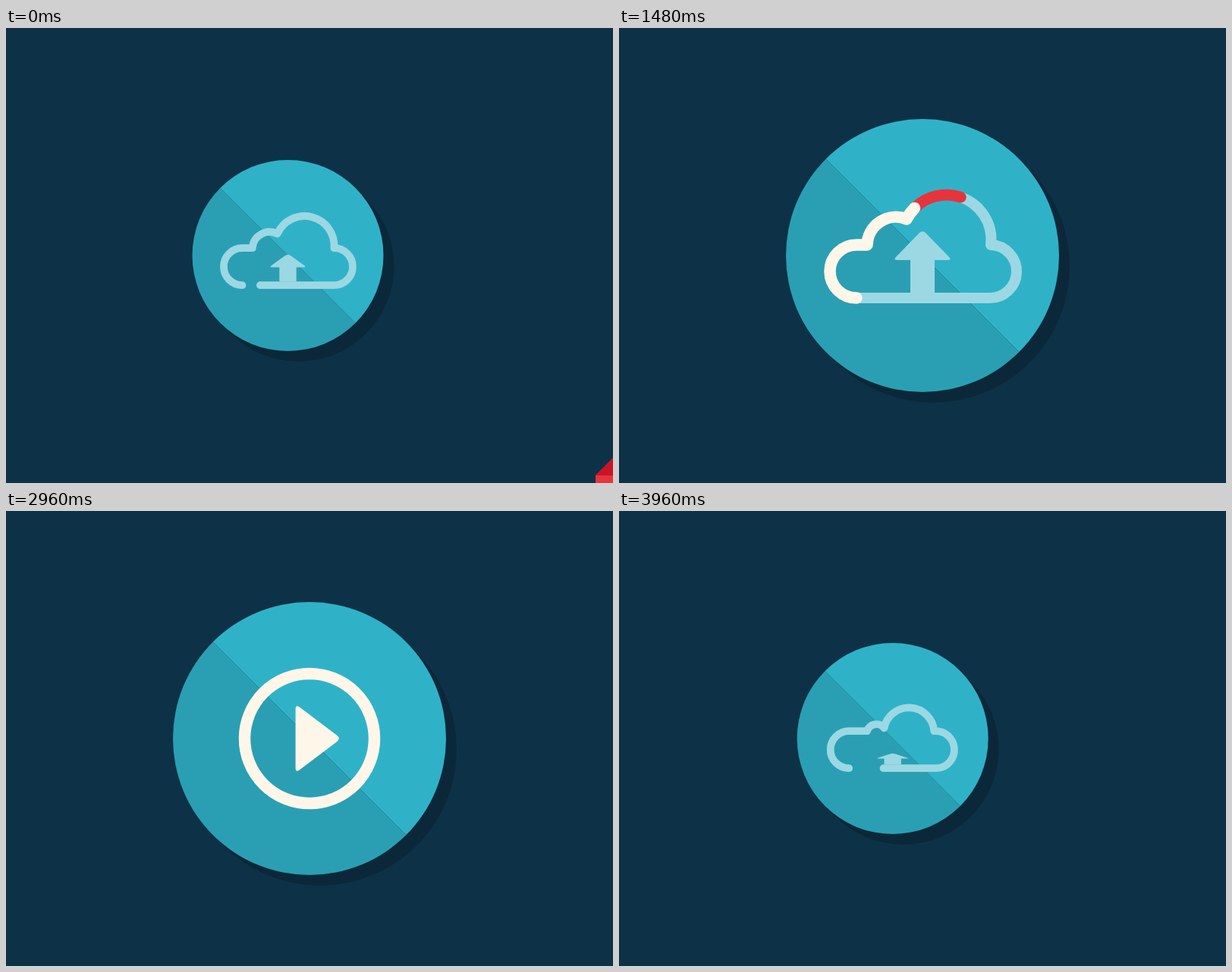
Animation of 800 by 600 pixels, one loop 4.04 s. Source, as an HTML page with a canvas:

```html
<!DOCTYPE html>
<html lang="en">
<head>
<meta charset="utf-8">
<title>Cloud upload</title>
<style>
  html, body { margin: 0; height: 100%; overflow: hidden; background: #0d3247; }
  canvas { display: block; width: 100vw; height: 100vh; }
</style>
</head>
<body>
<canvas id="stage" width="800" height="600"></canvas>
<script>
const g = document.getElementById('stage').getContext('2d');
const NAVY = '#0d3247', RED = '#e6343c', CREAM = '#fef7e9', PALE = '#9bd8e3';
const TEAL = '#2fb2c8', DEEP_TEAL = '#2a9fb3', SHADE = 'rgba(0,0,0,.2)';
const SHADOW = 14, LOOP = 4040, STEP = 40;

const mix = (a, b, p) => a + (b - a) * p;
const part = (t, from, to) => Math.min(1, Math.max(0, (t - from) / (to - from)));
const easeOut = (p, power) => 1 - (1 - p) ** power;
const easeInOut = p => (1 - Math.cos(Math.PI * p)) / 2;

// Blends two poses that share the same keys.
function blend(a, b, p) {
  return Object.fromEntries(Object.keys(a).map(key => [key, mix(a[key], b[key], p)]));
}

function at(x, y, scale, turn, draw) {
  g.save();
  g.translate(x, y);
  g.scale(scale, scale);
  g.rotate(turn * Math.PI / 180);
  draw();
  g.restore();
}

function fill(path, color) {
  g.fillStyle = color;
  g.fill(path);
}

// Strokes a path, or only the stretch between two distances along it.
function stroke(path, color, width, from = 0, to = 9999) {
  if (to <= from) return;
  g.strokeStyle = color;
  g.lineWidth = width;
  g.lineCap = g.lineJoin = 'round';
  g.setLineDash(to < 9999 ? [to - from, 9999] : []);
  g.lineDashOffset = -from;
  g.stroke(path);
}

// Polygon whose corners are cut back by `cut` and curved.
function softPolygon(points, cut) {
  const path = new Path2D();
  const toward = (a, b) => {
    const k = cut / Math.hypot(b[0] - a[0], b[1] - a[1]);
    return [mix(a[0], b[0], k), mix(a[1], b[1], k)];
  };
  points.forEach((p, i) => {
    const n = points.length;
    path.lineTo(...toward(p, points[(i + n - 1) % n]));
    path.quadraticCurveTo(...p, ...toward(p, points[(i + 1) % n]));
  });
  path.closePath();
  return path;
}

// Side lobes have radius `side`; two bumps join points a, b and c.
// A bump's radius is its chord times its bend.
const SEED = { left: -76, right: 79, side: 35, base: 56, ax: -17, ay: -14, bx: -10, by: 16,
  cx: 63, cy: -14, bendAB: .5, bendBC: .5 };
const CLOUD = { left: -87, right: 88, side: 35, base: 56, ax: -73, ay: -14, bx: -21, by: -48,
  cx: 90, cy: -14, bendAB: .61, bendBC: .508 };
const RING = { left: 0, right: 0, side: 85.5, base: 85.5, ax: 0, ay: -85.5, bx: 0, by: -85.5,
  cx: 0, cy: -85.5, bendAB: 2, bendBC: .62 };

const SPROUT = { tip: 58, wing: 54, half: 28.5, tail: 49 };
const ARROW = { tip: -34, wing: 6, half: 39, tail: 49 };
const PLAY = { tip: -42, wing: 18, half: 45, tail: 18 };

const sprouting = t => part(t, -160, 80);

function cloudPath(t) {
  const grown = sprouting(t);
  const c = t < 1000 ? blend(SEED, CLOUD, easeOut(grown, 2))
    : blend(CLOUD, RING, easeInOut(part(t, 2230, 2750)));
  const lineEnd = mix(15, c.left, grown);
  const lobe = (r, x, y) => `A${r} ${r} 0 0 1 ${x} ${y}`;
  const bump = (bend, x0, y0, x, y) => lobe(bend * Math.hypot(x - x0, y - y0), x, y);
  return new Path2D(`M${c.left} ${c.base}` + lobe(c.side, c.left, c.base - 2 * c.side) +
    `L${c.ax} ${c.ay}` + bump(c.bendAB, c.ax, c.ay, c.bx, c.by) +
    bump(c.bendBC, c.bx, c.by, c.cx, c.cy) + lobe(c.side, c.right, c.base) + `L${lineEnd} ${c.base}`);
}

function drawCloud(t) {
  if (t < -160) {
    stroke(new Path2D('M-10 44V-4A12 12 0 0 1 13 2M34 -17h.1'), PALE, 14);
    return;
  }
  const path = cloudPath(t), length = 652;
  const head = length * part(t, 1160, 1905), tail = length * part(t, 1235, 1980);
  if (tail === length) return stroke(path, CREAM, 15.5);
  stroke(path, PALE, 14);
  stroke(path, RED, 15, tail, head);
  stroke(path, CREAM, 15.5, 0, tail);
}

function drawArrow(t) {
  if (t < -130) return;
  const turned = easeInOut(part(t, 2230, 2670));
  const a = t < 1000 ? blend(SPROUT, ARROW, sprouting(t)) : blend(ARROW, PLAY, turned);
  const shape = color => {
    fill(softPolygon([[0, a.tip], [a.half, a.wing], [-a.half, a.wing]], 6), color);
    if (a.tail > a.wing) g.fillRect(-16, a.wing - 1, 32, a.tail - a.wing + 1);
  };
  at(0, 0, 1, 90 * turned, () => {
    g.translate(0, -20 * Math.sin(Math.PI * turned));
    shape(PALE);
    g.globalAlpha = part(t, 1900, 2080);
    shape(CREAM);
  });
}

function halfDisc(x, y, r, start, color) {
  const path = new Path2D();
  path.arc(x, y, r, start, start + Math.PI);
  fill(path, color);
}

function drawDisc(x, upper, lower, icon, t) {
  const up = -Math.PI * .75, down = Math.PI * .25;
  halfDisc(x + SHADOW, 300 + SHADOW, Math.min(upper, 180), up, SHADE);
  halfDisc(x + SHADOW, 300 + SHADOW, Math.min(lower, 180), down, SHADE);
  halfDisc(x, 300, upper, up, TEAL);
  halfDisc(x, 300, lower, down, DEEP_TEAL);
  at(x, 300, icon, 0, () => {
    drawCloud(t);
    if (t < 2680) drawArrow(t);
  });
}

// Springs from 126 past 180 and back.
function restingRadius(t) {
  const q = part(t, 386, 866) - 1;
  return 126 + 54 * (1 + 3.7 * q ** 3 + 2.7 * q * q);
}

function drawFile() {
  const paper = new Path2D('M46 0H138A12 12 0 0 1 150 12V168A12 12 0 0 1 138 180H12A12 12 0 0 1 0 168V46Z');
  const camera = new Path2D('M39 76H90Q92 76 92 78V92L109 80.5Q116 77 116 84V120Q116 127 109 123.5L92 112V125Q92 127 90 127H39Q37 127 37 125V78Q37 76 39 76Z');
  const shaded = (path, color) => {
    at(SHADOW, SHADOW, 1, 0, () => fill(path, SHADE));
    fill(path, color);
  };
  shaded(paper, RED);
  fill(new Path2D('M46 0V46H0Z'), '#cb1424');
  shaded(camera, '#ebf3fb');
}

function drawCursor(withShadow) {
  const path = new Path2D('M0 0V51L10.5 42L19 61L26 58L18 39L32 37Z');
  if (withShadow) at(8, 8, 1, 0, () => fill(path, SHADE));
  fill(path, '#1a1211');
  stroke(path, '#fff', 1.5);
}

function drawUpload(t) {
  const arrive = easeOut(part(t, 0, 600), 2);
  const x = mix(777, 443, arrive), y = mix(544, 279, arrive);
  const drop = part(t, 620, 900) ** 2, leave = part(t, 1130, 1400) ** 2;
  if (drop < 1) {
    at(mix(x + 75, 400, drop), mix(y + 90, 300, drop), 1 - drop, 0, () => {
      g.translate(-75, -90);
      drawFile();
    });
  }
  if (leave < 1) at(mix(x + 64, 820, leave), mix(y + 87, 320, leave), 1, 0, () => drawCursor(drop < .3));
}

// Turns while growing ever faster, never smaller than `least`.
function growingTriangle(t, start, least, color) {
  const age = Math.max(0, t - start);
  const height = Math.max(least, 32 * (age / 217) ** 4);
  if (!height) return;
  const back = -.307 * height, half = .756 * height;
  at(400, 300, 1, -8.5e-5 * age * age, () => fill(
    softPolygon([[back, -half], [back + height, 0], [back, half]], height * .115), color));
}

function drawNextDisc(t) {
  const x = 400 - 380 * Math.exp(-.00405 * (t - 3400));
  const radius = start => 126 * easeOut(part(t, start, start + 240), 3);
  drawDisc(x, radius(3605), radius(3637), .7, t - LOOP);

  const reach = 240 * Math.sin(Math.PI * part(t, 3400, 3826));
  if (reach < 1) return;
  const slash = new Path2D(`M${-reach} ${-reach}L${reach} ${reach}`);
  at(x + 6 + SHADOW, 306 + SHADOW, 1, 0, () => stroke(slash, SHADE, 1.5));
  at(x + 6, 306, 1, 0, () => stroke(slash, CREAM, 1.5));
}

function draw(t) {
  g.fillStyle = NAVY;
  g.fillRect(0, 0, 800, 600);
  if (t < 3720) {
    const r = restingRadius(t);
    drawDisc(400 - 28.5 * (1 - part(t, 0, 440)) ** 2, r, r, r / 180, t);
    if (t < 1400) drawUpload(t);
  }
  if (t >= 2680 && t < 3960) {
    growingTriangle(t, 3007, 60, CREAM);
    growingTriangle(t, 3183, 0, RED);
    growingTriangle(t, 3385, 0, NAVY);
  }
  if (t >= 3600) drawNextDisc(t);
  else if (t > 3400) drawSlashOnly(t);
}

function frame() {
  const t = performance.now() % LOOP;
  // The last picture stays for two steps.
  draw(Math.min(Math.floor(t / STEP) * STEP, LOOP - 2 * STEP));
  requestAnimationFrame(frame);
}

function drawSlashOnly(t) {
  const x = 400 - 380 * Math.exp(-.00405 * (t - 3400));
  const reach = 240 * Math.sin(Math.PI * part(t, 3400, 3826));
  at(x + 6, 306, 1, 0, () => stroke(new Path2D(`M${-reach} ${-reach}L${reach} ${reach}`), CREAM, 1.5));
}

frame();
</script>
</body>
</html>
```
